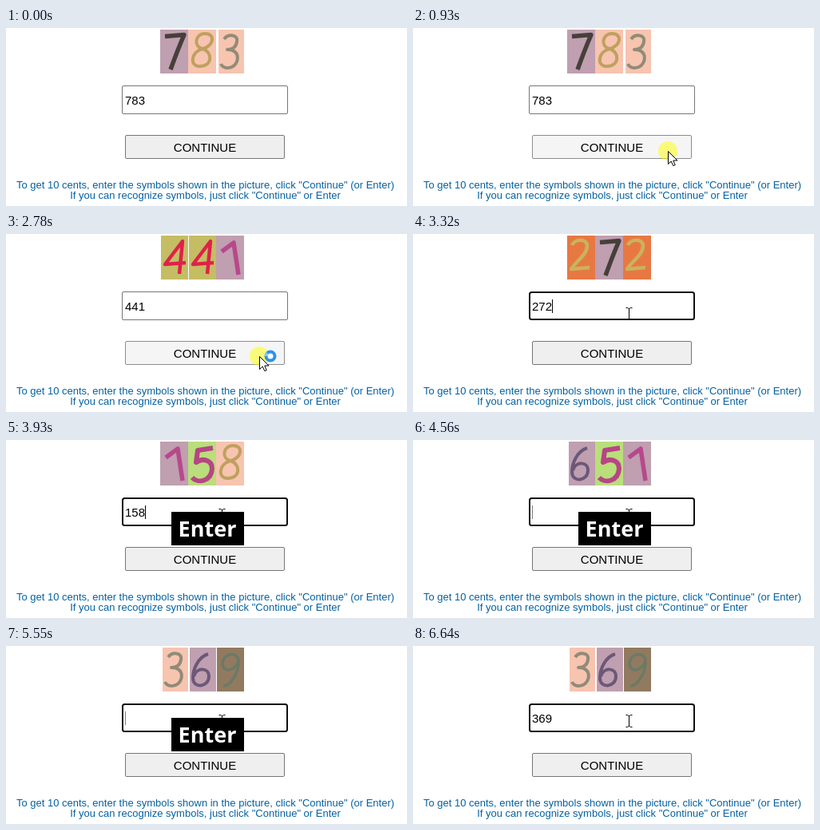
Recreate the animation shown at these times as an HTML page. Size 502x223 px, loop 6.81 s.

```html
<!DOCTYPE html>
<html lang="en">
<head>
<meta charset="utf-8">
<title>Symbol entry</title>
<style>
  html, body { margin: 0; width: 100%; height: 100%; overflow: hidden; background: #fff; }
  svg { display: block; width: 502px; height: 223px; font-family: "Liberation Sans", Arial, sans-serif; }
  .mid { text-anchor: middle; }
  .ui { font-size: 15px; }
  .note { font-size: 13px; fill: #0461a0; }
  .key { font: 700 27px "Open Sans", "Noto Sans", sans-serif; fill: #fff; }
  .glyph { fill: none; stroke-linejoin: round; }
</style>
</head>
<body>
<svg viewBox="0 0 502 223">
  <g id="code"></g>
  <rect id="field" fill="#fff"/>
  <text id="value" class="ui" x="149" y="96"></text>
  <rect id="caret" y="82" width="1" height="17"/>
  <rect id="button" x="149.5" y="134.5" width="199" height="29" rx="1.5"/>
  <text class="ui mid" x="249" y="155">CONTINUE</text>
  <text class="note mid" x="249.5" y="201">To get 10 cents, enter the symbols shown in the picture, click "Continue" (or Enter)</text>
  <text class="note mid" x="249.5" y="214">If you can recognize symbols, just click "Continue" or Enter</text>
  <g id="pointer">
    <circle id="halo" r="12" fill="#ffff00" fill-opacity=".5"/>
    <g id="busy" fill="none" stroke-width="4">
      <circle cx="14" r="5.5" fill="#fff" stroke="#2d93e8"/>
      <path d="M8.5 0A5.5 5.5 0 0 1 10.1 -3.9" stroke="#8cc8f2"/>
    </g>
    <path id="arrow" d="M.5.5V16.5L4.2 13 6.8 18.6 9.2 17.6 6.8 12H12Z" fill="#fff" stroke="#000"/>
    <path id="beam" d="M-3.5 -7.5H-1.5L.5 -6.5 2.5 -7.5H4.5M.5 -6.5V6.5M-3.5 7.5H-1.5L.5 6.5 2.5 7.5H4.5" fill="none" stroke="#000"/>
  </g>
  <g id="enter">
    <rect x="207" y="90" width="91" height="42"/>
    <text class="key mid" x="252" y="121">Enter</text>
  </g>
</svg>
<script>
const LOOP = 6810, BLINK = 535;
const $ = id => document.getElementById(id);

// digit: tile width, tile colour, ink, stroke width, path inside the tile
const DIGITS = {
  1: [35, '#bf9fb0', '#b8488c', 5.5, 'M7 20 22 9 28 49'],
  2: [35, '#e87843', '#c9b35c', 4.5, 'M6 12C9 4 25 3 25 13C25 24 11 32 5 42L28 40'],
  3: [32, '#f7c4b0', '#918b78', 4, 'M7 12C12 5 25 6 23 15C22 23 16 25 11 25C21 25 26 31 23 40C19 50 6 50 3 43'],
  4: [34, '#c5bd63', '#de224a', 4.5, 'M23 48 27 7 5 36 31 34'],
  5: [35, '#b9de7b', '#b74585', 6, 'M31 8 12 11 10 26C18 20 30 23 30 34C29 50 12 53 5 45'],
  6: [33, '#bf9fb0', '#6c5878', 4, 'M23 8C10 12 4 28 4 38C4 52 24 50 24 36C24 25 9 24 5 36'],
  7: [35, '#bf9fb0', '#463f3a', 5.5, 'M6 8.5 30 6.5Q22 25 13 50'],
  8: [35, '#f7c4b0', '#c0a05e', 4, 'M18 24C6 21 9 5 21 5C35 5 32 21 18 24C3 28 2 46 14 46C31 46 31 28 18 24'],
  9: [34, '#917a60', '#6b7a66', 3.5, 'M27 16C26 5 8 6 7 20C7 32 24 30 27 16C28 30 18 48 8 48']
};

// time, symbols in the picture, typed text, field focused
const PAGES = [
  [0, '783', '783', false],
  [1010, '725', '725', true], [1780, '725', '725', false],
  [1930, '836', '836', true], [2160, '836', '836', false],
  [2320, '441', '441', true], [2780, '441', '441', false],
  [3010, '272', '', false], [3160, '272', '272', true],
  [3930, '158', '158', true], [4390, '158', '', true],
  [4480, '651', '', true], [4620, '651', '651', true], [4700, '651', '', true],
  [4780, '274', '', true], [4850, '274', '274', true],
  [4930, '445', '', true], [5010, '445', '445', true], [5080, '445', '', true],
  [5160, '913', '', true], [5240, '913', '913', true], [5320, '913', '', true],
  [5400, '586', '', true], [5550, '369', '', true], [5800, '369', '369', true]
];

// time, x, y of the pointer
const MOVES = [
  [150, 357, 197], [230, 350, 188], [310, 341, 176], [390, 332, 166],
  [470, 325, 159], [550, 321, 155], [630, 319, 154],
  [1320, 318, 153], [1390, 317, 153],
  [3160, 304, 140], [3240, 284, 114], [3320, 270, 100],
  [3400, 271, 99], [3470, 273, 98], [3550, 274, 97], [3700, 270, 94]
];

// mouse down, next page
const CLICKS = [[860, 1010], [1780, 1930], [2160, 2320], [2780, 3010]];

const at = (table, t) => table.findLast(row => row[0] <= t);
const within = (t, a, b) => t >= a && t < b;
const show = (id, on) => $(id).setAttribute('visibility', on ? 'visible' : 'hidden');
const set = (id, attrs) => {
  for (const k in attrs) $(id).setAttribute(k, attrs[k]);
};

function drawCode(code) {
  $('code').innerHTML = [...code].map((d, i) => {
    const [w, paper, ink, weight, path] = DIGITS[d];
    return `<g transform="translate(${228 + 35 * i - w} 2)">
      <rect width="${w}" height="55" fill="${paper}"/>
      <path class="glyph" d="${path}" stroke="${ink}" stroke-width="${weight}"/></g>`;
  }).join('');
}

function drawField(focus) {
  set('field', focus
    ? { x: 146, y: 73, width: 206, height: 34, rx: 2.5, stroke: '#101010', 'stroke-width': 2 }
    : { x: 145.5, y: 72.5, width: 207, height: 35, rx: 1.5, stroke: '#767676', 'stroke-width': 1 });
}

function drawPointer(t) {
  const move = at(MOVES, t);
  const [, x, y] = move || [0, 0, 0];
  const overField = within(y, 72, 108);
  const overButton = within(x, 149, 349) && within(y, 134, 164);
  const click = CLICKS.find(([a, b]) => within(t, a, b));
  set('pointer', { transform: `translate(${x} ${y})` });
  show('arrow', move && !overField);
  show('beam', move && overField);
  show('halo', click && t < click[0] + 80);
  show('busy', within(t, 2780, 2930));
  set('button', {
    fill: click ? '#f5f5f5' : overButton ? '#e5e5e5' : '#efefef',
    stroke: click ? '#8d8d8d' : '#767676'
  });
}

let page;
function frame(now) {
  const t = now % LOOP;
  const next = at(PAGES, t);
  const [start, code, text, focus] = next;
  if (next !== page) {
    page = next;
    drawCode(code);
    drawField(focus);
    $('value').textContent = text;
    set('caret', { x: text ? 174 : 149, opacity: text ? 1 : .5 });
  }
  show('caret', focus && Math.floor((t - start) / BLINK) % 2 === 0);
  drawPointer(t);
  show('enter', within(t, 3850, 6640));
}

const begin = performance.now();
function tick() {
  frame(performance.now() - begin);
  requestAnimationFrame(tick);
}
tick();
</script>
</body>
</html>
```
